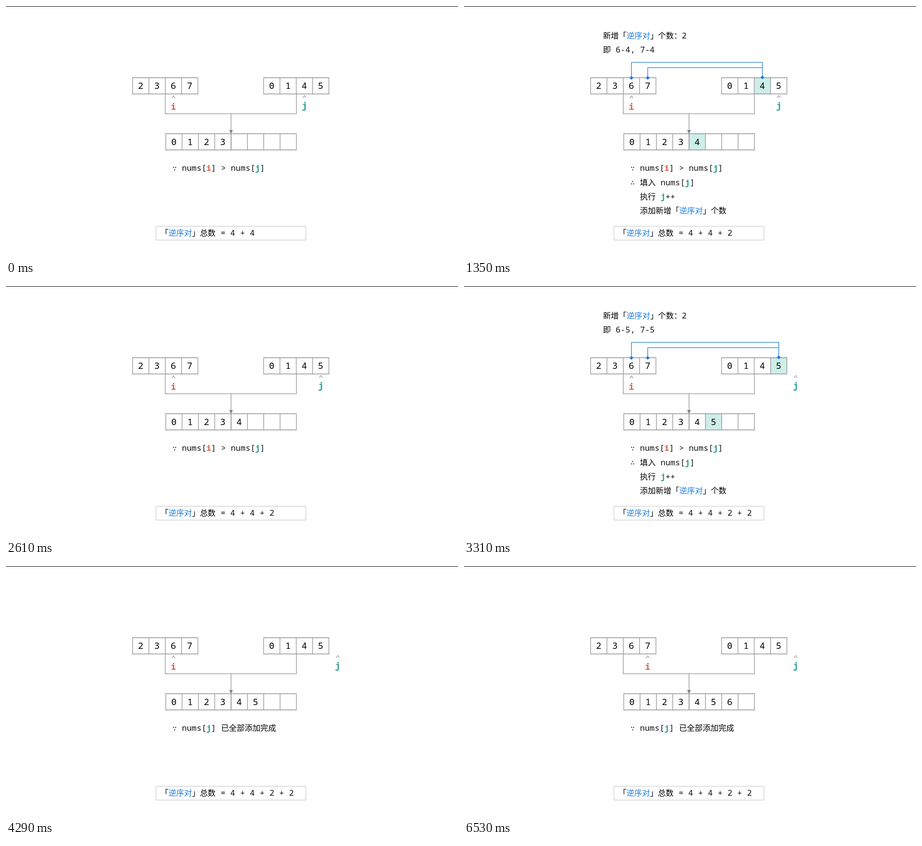
Animation of 930x520 px, one loop 7.02 s. Source, as an HTML page:

```html
<!DOCTYPE html>
<html lang="zh-CN">
<head>
<meta charset="utf-8">
<title>归并排序统计逆序对</title>
<style>
  html, body { margin: 0; width: 100%; height: 100%; overflow: hidden; background: #fff; }
  svg { display: block; width: 930px; height: 520px; }
  text { font: 16.75px "Noto Sans Mono", "Noto Sans CJK SC", "Noto Sans CJK", monospace; white-space: pre; fill: #111; text-spacing-trim: space-all; }
  .zh { font-family: "Noto Sans CJK SC", "Noto Sans CJK", sans-serif; font-size: 16.2px; fill: #000; }
  .blue { fill: #1a7be0; }
  .i, .j { font-weight: 700; }
  .i { fill: #e05c45; }
  .j { fill: #2a9d8f; }
  .cells text { font-size: 18.5px; text-anchor: middle; fill: #000; }
  .zero { font-family: "DejaVu Sans Mono", monospace; font-size: 18px; }
  .sign { font-family: "DejaVu Sans Mono", monospace; font-size: 14px; text-anchor: middle; }
  .pointer text { font-size: 18.5px; text-anchor: middle; }
  .grey { fill: none; stroke: #949494; stroke-width: 1.3; }
  .caret { fill: none; stroke: #888; stroke-width: 1.1; }
  .link { fill: none; stroke: #2380d8; stroke-width: 1.3; }
  .dot { fill: #1a7be0; }
  .teal { fill: #cdeee9; }
  .red { fill: #f9dad5; }

  /* Steps: 1310, 2330, 3310, 4290, 5220 and 6290 ms of 7020 ms */
  [class*="on-"], .move-i, .move-j { animation: 7020ms step-end infinite; }
  .on-take4 { animation-name: take4; }
  .on-take5 { animation-name: take5; }
  .on-take-j { animation-name: takeJ; }
  .on-take6 { animation-name: take6; }
  .on-compare { animation-name: compare; }
  .on-done { animation-name: done; }
  .on-has4 { animation-name: has4; }
  .on-has5 { animation-name: has5; }
  .on-has6 { animation-name: has6; }
  .move-i { animation-name: moveI; }
  .move-j { animation-name: moveJ; }
  @keyframes take4 { 0%, 33.19%, 100% { opacity: 0 } 18.66% { opacity: 1 } }
  @keyframes take5 { 0%, 61.11%, 100% { opacity: 0 } 47.15% { opacity: 1 } }
  @keyframes takeJ { 0%, 33.19%, 61.11%, 100% { opacity: 0 } 18.66%, 47.15% { opacity: 1 } }
  @keyframes take6 { 0%, 89.6%, 100% { opacity: 0 } 74.358% { opacity: 1 } }
  @keyframes compare { 0% { opacity: 1 } 61.11%, 100% { opacity: 0 } }
  @keyframes done { 0% { opacity: 0 } 61.11%, 100% { opacity: 1 } }
  @keyframes has4 { 0% { opacity: 0 } 18.66%, 100% { opacity: 1 } }
  @keyframes has5 { 0% { opacity: 0 } 47.15%, 100% { opacity: 1 } }
  @keyframes has6 { 0% { opacity: 0 } 74.358%, 100% { opacity: 1 } }
  @keyframes moveI { 0% { transform: none } 74.358%, 100% { transform: translateX(33.4px) } }
  @keyframes moveJ {
    0% { transform: none }
    18.66% { transform: translateX(33.6px) }
    47.15%, 100% { transform: translateX(68.2px) }
  }
</style>
</head>
<body>
<svg viewBox="0 0 930 520">
  <defs>
    <path id="four" class="grey" d="M0 0h134.4v33.5H0zM33.6 0v33.5M67.2 0v33.5M100.8 0v33.5"/>
    <rect id="cell" width="33.6" height="33.5"/>
    <path id="diamond" class="dot" d="M0-4 4 0 0 4-4 0z"/>
    <path id="caret" class="caret" d="M-3.4 2.5 0-2.3 3.4 2.5"/>
  </defs>
  <rect width="930" height="1"/>

  <g class="on-take4 teal"><use href="#cell" x="597.2" y="148"/><use href="#cell" x="463" y="263.5"/></g>
  <g class="on-take5 teal"><use href="#cell" x="630.8" y="148"/><use href="#cell" x="496.6" y="263.5"/></g>
  <g class="on-take6 red"><use href="#cell" x="327.7" y="148"/><use href="#cell" x="530.2" y="263.5"/></g>

  <use href="#four" x="260.5" y="148"/>
  <use href="#four" x="530" y="148"/>
  <use href="#four" x="328.7" y="263.5"/>
  <use href="#four" x="463.1" y="263.5"/>
  <path class="grey" d="M327.6 181.5V222.3H597.5V181.5M463 222.3V258"/>
  <path fill="#808080" d="M459 256h8l-4 7.5z"/>

  <g class="cells">
    <text x="277 310.6 344.3 377.8" y="170.6">2367</text>
    <text x="546.6 580.2 613.8 647.4" y="170.6"><tspan class="zero">0</tspan>145</text>
    <text x="345.3 378.9 412.5 446.1" y="286.6"><tspan class="zero">0</tspan>123</text>
    <text class="on-has4" x="479.7" y="286.6">4</text>
    <text class="on-has5" x="513.3" y="286.6">5</text>
    <text class="on-has6" x="546.9" y="286.6">6</text>
  </g>

  <g class="pointer move-i"><use href="#caret" x="344.6" y="187.8"/><text class="i" x="344.6" y="213.8">i</text></g>
  <g class="pointer move-j"><use href="#caret" x="614.2" y="187"/><text class="j" x="614.2" y="212.3">j</text></g>

  <g class="on-take-j">
    <text class="zh" x="286" y="66.7">新增「<tspan class="blue">逆序对</tspan>」个数：</text>
    <text x="448" y="66.7">2</text>
    <text class="zh" x="286" y="96.4">即</text>
    <text class="sign" x="347" y="369">∴</text>
    <text x="362" y="369.5"><tspan class="zh">填入</tspan> nums[<tspan class="j">j</tspan>]</text>
    <text x="362" y="399"><tspan class="zh">执行</tspan> <tspan class="j">j</tspan>++</text>
    <text class="zh" x="362" y="428.3">添加新增「<tspan class="blue">逆序对</tspan>」个数</text>
  </g>
  <g class="on-take4">
    <text x="312" y="96.4">6-4, 7-4</text>
    <path class="link" d="M344.5 148V116.3H614V148M378 148V127.4H614"/>
    <use href="#diamond" x="344.5" y="148.3"/><use href="#diamond" x="378" y="148.3"/><use href="#diamond" x="614" y="147.3"/>
  </g>
  <g class="on-take5">
    <text x="312" y="96.4">6-5, 7-5</text>
    <path class="link" d="M344.5 148V116.3H647.6V148M378 148V127.4H647.6"/>
    <use href="#diamond" x="344.5" y="148.3"/><use href="#diamond" x="378" y="148.3"/><use href="#diamond" x="647.6" y="147.3"/>
  </g>

  <text class="sign" x="347" y="339.5">∵</text>
  <text class="on-compare" x="362" y="340">nums[<tspan class="i">i</tspan>] &gt; nums[<tspan class="j">j</tspan>]</text>
  <text class="on-done" x="362" y="340">nums[<tspan class="j">j</tspan>] <tspan class="zh">已全部添加完成</tspan></text>
  <g class="on-take6">
    <text class="sign" x="347" y="369">∴</text>
    <text x="362" y="369.5"><tspan class="zh">填入</tspan> nums[<tspan class="i">i</tspan>]</text>
    <text x="362" y="399"><tspan class="zh">执行</tspan> <tspan class="i">i</tspan>++</text>
  </g>

  <rect x="308.5" y="454.5" width="308.5" height="28.5" fill="none" stroke="#ccc" stroke-width="1.2"/>
  <text class="zh" x="318" y="474">「<tspan class="blue">逆序对</tspan>」总数</text>
  <text x="441.5" y="474">= 4 + 4</text>
  <text class="on-has4" x="521.9" y="474">+ 2</text>
  <text class="on-has5" x="562.1" y="474">+ 2</text>
</svg>
</body>
</html>
```
